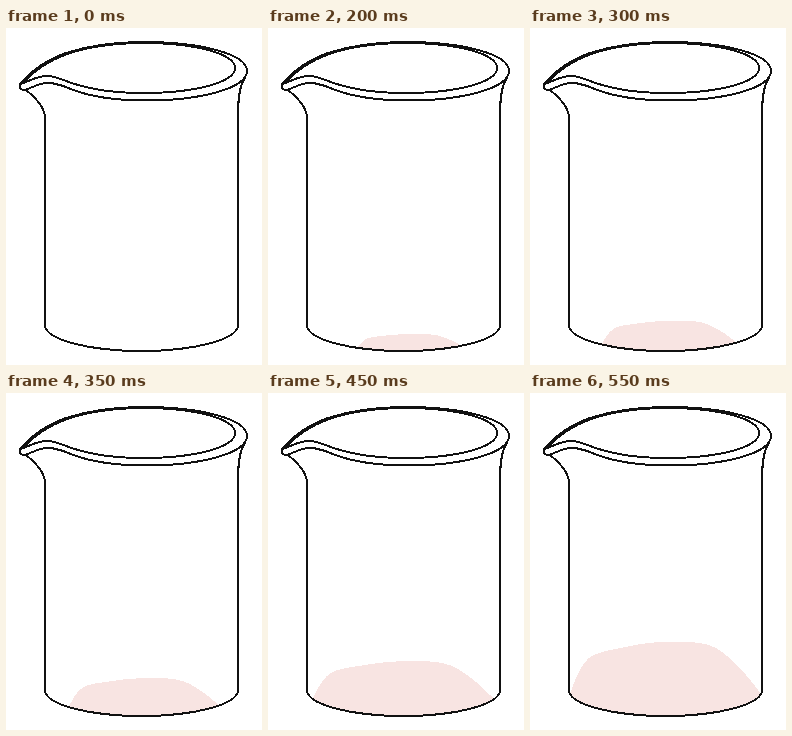
These frames come from a looping animation (256 px wide and 337 px high, 600 ms). An HTML page:

```html
<!DOCTYPE html>
<html lang="en">
<head>
<meta charset="utf-8">
<title>Filling beaker</title>
<style>
  html, body { margin: 0; width: 100%; height: 100%; overflow: hidden; background: #fff; }
  svg { display: block; width: 256px; height: 337px; shape-rendering: crispEdges; }
  .glass { fill: none; stroke: #111; stroke-width: 2; stroke-linejoin: round; stroke-linecap: round; }
</style>
</head>
<body>
<svg viewBox="0 0 256 337">
  <clipPath id="inside"><path d="M39 88V297A96.5 26 0 0 0 232 297V88Z"/></clipPath>
  <path id="liquid" fill="#f8e4e2" clip-path="url(#inside)"/>
  <g class="glass">
    <!-- body, with flared neck -->
    <path d="M20 62C28 68 39 79 39 90V297A96.5 26 0 0 0 232 297V90C232 72 233 58 239 50"/>
    <!-- outer rim and spout -->
    <path d="M14 56C25 43 40 32 60 25C82 18 108 14 137 14C195 14 241 26 241 43C241 60 195 72.5 140 72.5C108 72.5 83 68 66 61.5C56 57.5 50 55 42 55C31 55 25 61 18 62C14 62 13 59 14 56Z"/>
    <!-- inner rim -->
    <path d="M14 56C22 54 30 48 41 48C50 48 56 52 67 55.5C87 62 110 65 137 65C190 65 229 54 229 40C229 26 190 15 137 15C108 15 82 19 61 26C42 33 28 43 18 54"/>
  </g>
</svg>
<script>
const LOOP = 600, STEP = 50;
// Mound profile: fraction of width, fraction of height
const profile = [[0, 0], [.05, .45], [.12, .74], [.27, .89], [.47, 1], [.72, .95], [.87, .57], [1, 0]];
const liquid = document.getElementById('liquid');

const glassFloor = x => 297 + 26 * Math.sqrt(1 - ((x - 135.5) / 96.5) ** 2);

function mound(p) {
  const left = Math.max(40, 125 - 98 * p);
  const right = Math.min(231, 168 + 71 * p);
  const top = 325.4 - 40 * p - 36.3 * p * p;
  const points = profile.map(([u, v]) => {
    const base = glassFloor(u < .5 ? left : right);
    return [left + (right - left) * u, base + (top - base) * v];
  });
  return `M${smooth(points)}L${right} 330H${left}Z`;
}

// Catmull-Rom curve through the points
function smooth(pts) {
  const at = i => pts[Math.min(pts.length - 1, Math.max(0, i))];
  return pts.slice(1).reduce((d, r, i) => {
    const p = at(i - 1), q = at(i), s = at(i + 2);
    const c1 = q.map((n, j) => n + (r[j] - p[j]) / 6);
    const c2 = r.map((n, j) => n - (s[j] - q[j]) / 6);
    return `${d}C${c1} ${c2} ${r}`;
  }, `${pts[0]}`);
}

function draw() {
  const step = Math.floor((performance.now() % LOOP) / STEP);
  liquid.setAttribute('d', step ? mound(step * STEP / (LOOP - STEP)) : '');
  requestAnimationFrame(draw);
}
draw();
</script>
</body>
</html>
```
